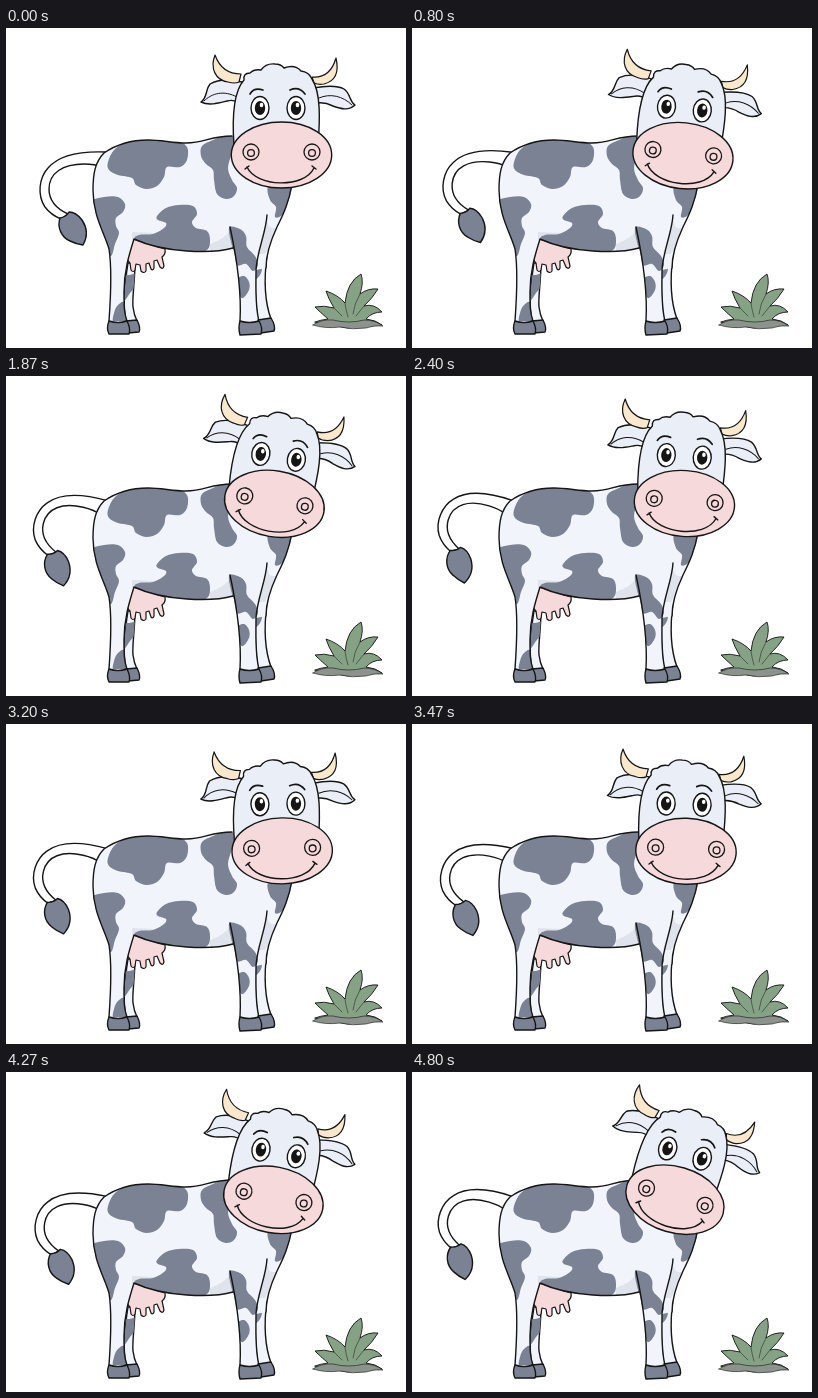
Animation, 400 px wide and 320 px high, one loop 5070 ms. Source, as an HTML page with a canvas:

```html
<!DOCTYPE html>
<html lang="en">
<head>
<meta charset="utf-8">
<title>Cow</title>
<style>
html, body { margin: 0; width: 100%; height: 100%; overflow: hidden; background: #fff; }
canvas { display: block; width: 400px; height: 320px; }
</style>
</head>
<body>
<canvas id="stage" width="400" height="320"></canvas>
<script>
const ctx = document.getElementById('stage').getContext('2d');
const LOOP = 5070, STEP = 800 / 3, POSES = 19;
const INK = '#151515', COAT = '#f1f5fb', FACE = '#e9eef7', SPOT = '#7b8293',
      PINK = '#f6d9da', HORN = '#f9e8cb', SHADE = '#dfe3eb', LEAF = '#86a285';

// Closed smooth curve running through "x,y x,y ..." points.
function blob(text) {
  const pts = text.split(' ').map(p => p.split(',').map(Number));
  const at = i => pts[(i + pts.length) % pts.length];
  const path = new Path2D();
  path.moveTo(...pts[0]);
  pts.forEach((b, i) => {
    const a = at(i - 1), c = at(i + 1), d = at(i + 2);
    path.bezierCurveTo(b[0] + (c[0] - a[0]) / 6, b[1] + (c[1] - a[1]) / 6,
      c[0] - (d[0] - b[0]) / 6, c[1] - (d[1] - b[1]) / 6, c[0], c[1]);
  });
  path.closePath();
  return path;
}

function oval(x, y, rx, ry = rx) {
  const path = new Path2D();
  path.ellipse(x, y, rx, ry, 0, 0, Math.PI * 2);
  return path;
}

function paint(path, fill, width = 1.4) {
  if (fill) { ctx.fillStyle = fill; ctx.fill(path); }
  if (width) { ctx.lineWidth = width; ctx.strokeStyle = INK; ctx.stroke(path); }
}

function within(clip, draw) {
  ctx.save();
  ctx.clip(clip);
  draw();
  ctx.restore();
}

function turned(x, y, degrees, draw) {
  ctx.save();
  ctx.translate(x, y);
  ctx.rotate(degrees * Math.PI / 180);
  ctx.translate(-x, -y);
  draw();
  ctx.restore();
}

const body = new Path2D(`M98,125 C111,116 125,112 142,112 C156,112 166,115 180,115 C199,115 204,108 226,108
  L286,135 L286,160 C283,174 278,185 271,199 C264,214 260,227 260,240 L250,242 C250,262 249,278 253,293
  L234,293 C236,268 232,240 227,220 C206,226 158,225 128,211 C123,227 118,243 118,264 C118,278 118,285 121,293
  L103,293 C105,265 106,240 103,221 C98,204 87,188 87,162 C87,146 89,134 98,125 Z`);
const bodyLine = new Path2D(`M226,108 C204,108 199,115 180,115 C166,115 156,112 142,112 C125,112 111,116 98,125
  C89,134 87,146 87,162 C87,188 98,204 103,221 C106,240 105,265 103,293
  M121,293 C118,285 118,278 118,264 C118,243 123,227 128,211 C158,225 206,226 227,220
  M224,199 C229,222 236,258 234,293 M253,293 C249,278 250,262 250,242 C251,223 260,205 261,187
  M286,156 C283,174 278,185 271,199 C264,214 260,227 260,240`);
const spots = [
  '102,134 109,121 125,112 145,110 170,113 181,119 181,132 174,139 161,139 158,149 151,158 140,161 130,157 126,150 112,147 103,142',
  '196,118 207,112 224,106 231,110 226,125 222,140 226,152 231,160 228,168 220,171 211,166 208,152 207,142 200,136 195,128',
  '151,188 160,180 173,177 187,178 191,186 186,194 190,200 201,203 204,212 201,222 185,226 155,224 130,212 133,207 147,206 158,200 160,195 152,192',
  '84,174 98,169 112,169 119,176 117,184 110,190 110,198 113,205 109,216 104,228 92,206 84,190',
  '223,200 234,201 240,208 241,219 249,228 252,237 247,243 240,236 231,237 227,222',
  '262,159 275,155 290,156 283,174 276,187 269,189 270,179 264,172',
  '231,252 238,248 243,254 243,262 237,270 233,266',
  '119,275 112,277 108,285 108,295 124,295'
].map(blob);
const shades = [
  'M126,204 L150,205 L160,220 L126,212 Z',
  'M204,216 Q219,211 225,201 L229,222 L204,225 Z',
  'M261,190 Q262,205 273,198 L259,226 L251,226 Z'
].map(d => new Path2D(d));

const hindLeg = new Path2D('M122,235 L129,235 C129,252 126,270 127,279 Q128,287 131,293 L120,293 C117,280 118,260 122,235 Z');
const foreLeg = new Path2D('M250,225 L261,227 C258,250 258,272 265,291 L252,293 C249,275 248,245 250,225 Z');
const hoofs = [
  'M120,293 L131,292 Q135,300 133,304 L122,305 Z',
  'M252,292 L265,290 Q270,298 268,303 L255,305 Z',
  'M103,293 Q112,296 121,293 Q125,301 123,306 L103,306 Q100,300 103,293 Z',
  'M234,293 Q243,296 253,293 Q257,300 255,306 L234,307 Q232,300 234,293 Z'
].map(d => new Path2D(d));
const udder = new Path2D(`M127,211 C121,222 119,231 124,235 L125,242 Q127,245 129,242 L130,236 L134,237
  L135,243 Q138,246 140,243 L140,236 L143,235 L145,241 Q147,243 148,240 L148,233 L151,232
  L154,239 Q157,242 158,238 L156,229 Q160,226 159,221 Z`);

const tail = new Path2D(`M100,124 C76,123 53,127 42,140 C33,150 31,167 39,179 Q45,187 55,191 L62,186
  C49,180 43,172 43,161 C43,145 57,136 78,136 Q89,136 96,139`);
const tuft = new Path2D('M54,190 C51,199 55,209 64,213 Q70,216 77,217 C81,210 82,201 76,192 Q70,184 63,184 Q60,189 54,190 Z');

const leftEar = new Path2D('M236,54 C223,51 211,52 204,56 C199,62 202,69 195,74 C203,78 213,75 221,73 Q228,71 233,75 Z');
const rightEar = new Path2D('M307,60 C318,58 331,57 338,61 C345,66 343,73 349,77 C343,83 335,81 327,78 Q319,74 311,75 Z');
const earFolds = new Path2D('M198,73 C206,65 218,62 231,69 M346,77 C337,68 324,65 313,70');
const leftHorn = new Path2D('M209,27 C204,40 209,52 222,54 Q229,56 233,54 L235,46 C223,46 214,41 209,27 Z');
const rightHorn = new Path2D('M330,30 C333,43 330,53 318,56 Q312,57 308,55 L306,49 C318,50 326,44 330,30 Z');
const skull = new Path2D(`M228,118 C226,90 228,63 238,52 Q237,45 244,45 Q248,41 255,42 Q260,35 269,36
  Q275,36 278,40 Q289,36 295,43 Q303,44 306,51 C315,65 314,91 312,118 Z`);
const brows = new Path2D('M244,66 Q248,59 257,62 M284,62 Q293,58 299,66');
const smile = new Path2D('M241,139 C250,159 298,161 308,140 M239,141 L243,138 M306,138 L310,141');
const muzzle = oval(275.5, 127, 50.2, 33);

const leaves = new Path2D(`M309,294 Q314,292 322,291 Q314,284 309,279 Q318,277 328,280 Q322,270 320,263
  Q332,267 339,275 Q341,254 355,246 Q358,254 354,266 Q362,260 372,261 Q366,271 358,278
  Q368,275 376,284 Q366,284 360,291 Q370,292 376,297 L342,300 Z`);
const veins = new Path2D('M339,275 Q340,283 342,289 M354,266 Q348,276 347,286 M328,280 L336,288 M358,278 L350,288');
const soil = new Path2D('M307,297 Q315,291 327,292 Q343,296 358,292 Q369,292 377,298 Q368,297 360,300 Q346,302 334,299 Q319,301 307,297 Z');

function drawPlant() {
  paint(leaves, LEAF, 0.9);
  paint(veins, null, 0.5);
  paint(soil, '#8c938d', 0.6);
}

function drawTail() {
  paint(tail, '#fff');
  paint(tuft, SPOT);
}

function drawBody() {
  for (const leg of [hindLeg, foreLeg]) paint(leg, COAT);
  within(hindLeg, () => paint(blob('115,249 123,247 131,246 130,257 124,265 116,274'), SPOT, 0));
  within(foreLeg, () => paint(blob('246,235 252,232 256,239 254,247 248,251'), SPOT, 0));
  paint(udder, PINK, 1.2);
  paint(body, COAT, 0);
  within(body, () => {
    shades.forEach(s => paint(s, SHADE, 0));
    spots.forEach(s => paint(s, SPOT, 0));
  });
  paint(bodyLine);
  hoofs.forEach(h => paint(h, SPOT));
}

function drawHead() {
  paint(leftEar, FACE);
  paint(rightEar, FACE);
  paint(earFolds, null, 1);
  paint(leftHorn, HORN, 1.2);
  paint(rightHorn, HORN, 1.2);
  paint(skull, FACE);
  for (const x of [254, 290]) {
    paint(oval(x, 80, 9, 11.5), '#fff');
    paint(oval(x, 80, 5.2, 7), INK, 0);
    paint(oval(x + 1.5, 77, 1.8, 2.2), '#fff', 0);
  }
  paint(brows, null, 1.7);
  paint(muzzle, PINK);
  for (const x of [245, 306]) {
    paint(oval(x, 124, 8), PINK, 1.3);
    paint(oval(x, 125, 3.4), PINK, 1.3);
  }
  paint(smile);
}

// Linear interpolation over [time, value] keys.
function tween(keys, t) {
  const i = Math.max(1, keys.findIndex(k => k[0] >= t));
  const [t0, v0] = keys[i - 1], [t1, v1] = keys[i];
  return v0 + (v1 - v0) * (t - t0) / (t1 - t0);
}

const headSwing = [[0, 0], [1600, 12], [2933, -1.2], [3200, -0.9], [LOOP, 19.4]];
const tailSwing = [[0, 0], [2600, 18.5], [4000, 6.3], [LOOP, 20]];

function poseTime(t) {
  let n = POSES - 1;
  while (Math.round(n * STEP / 10) * 10 > t) n--;
  return n * STEP;
}

function frame(now) {
  const t = poseTime(Math.max(0, now) % LOOP);
  ctx.fillStyle = '#fff';
  ctx.fillRect(0, 0, 400, 320);
  ctx.lineCap = ctx.lineJoin = 'round';
  drawPlant();
  turned(98, 130, tween(tailSwing, t), drawTail);
  drawBody();
  turned(267, 84, tween(headSwing, t), drawHead);
  requestAnimationFrame(frame);
}
frame(0);
</script>
</body>
</html>
```
